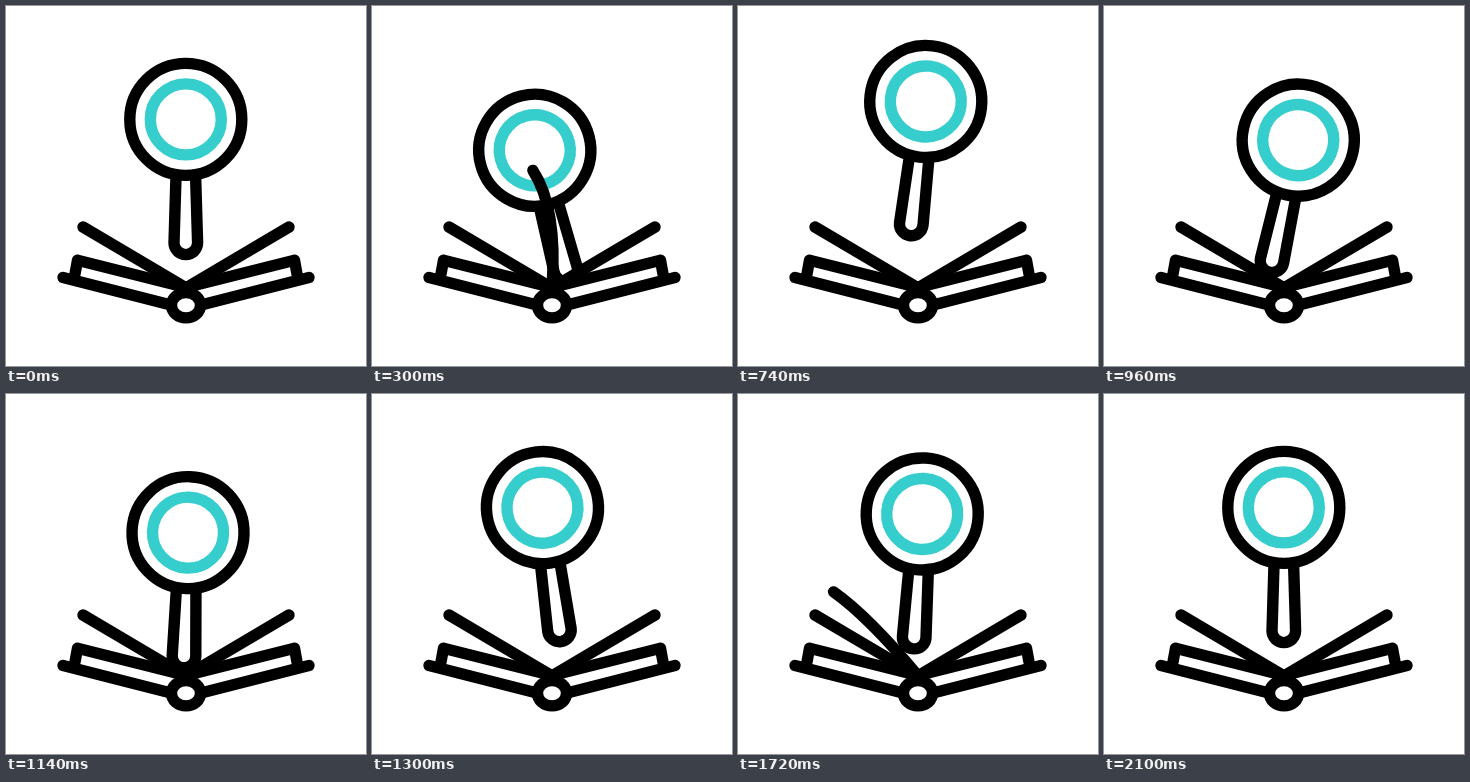
Animation of 360x360 px, one loop 2.4 s. Source, as an HTML page with a canvas:

```html
<!DOCTYPE html>
<html>
<head>
<meta charset="utf-8">
<title>Magnifier over a book</title>
<style>
html, body { margin: 0; width: 100%; height: 100%; overflow: hidden; background: #fff; }
canvas { display: block; width: 360px; height: 360px; }
</style>
</head>
<body>
<canvas id="stage" width="360" height="360"></canvas>
<script>
const ctx = document.getElementById('stage').getContext('2d');
const LOOP = 2400, INK = '#000', TEAL = '#36cdcd';

// [time, value] keys: height of the pivot and tilt in degrees
const LIFT = [[0, 181.4], [350, 211.7], [700, 161.3], [1070, 211], [1420, 170], [1750, 188.2], [2100, 181.4]];
const TILT = [[0, 0], [300, 14.5], [930, -12.6], [1350, 8.7], [1750, -3.9], [2100, 0]];
const FLIPS = [86, 1617], FLIP_TIME = 480;
const PAGE = 119, REST = 30.5 * Math.PI / 180;
const SPINE = { x: 180, y: 281.8 };

const ease = p => p * p * (3 - 2 * p);

function valueAt(keys, t) {
  for (let i = 1; i < keys.length; i++) {
    const [t0, a] = keys[i - 1], [t1, b] = keys[i];
    if (t < t1) return a + (b - a) * ease((t - t0) / (t1 - t0));
  }
  return keys[keys.length - 1][1];
}

function line(...pts) {
  ctx.beginPath();
  pts.forEach(([x, y]) => ctx.lineTo(x, y));
  ctx.stroke();
}

function ring(x, y, rx, ry, color) {
  ctx.strokeStyle = color;
  ctx.beginPath();
  ctx.ellipse(x, y, rx, ry, 0, 0, Math.PI * 2);
  ctx.stroke();
}

function magnifier(t) {
  ctx.save();
  ctx.translate(179.8, valueAt(LIFT, t));
  ctx.rotate(-valueAt(TILT, t) * Math.PI / 180);
  ring(0, -68, 35.5, 35.5, TEAL);
  ring(0, -68, 56, 56, INK);
  ctx.beginPath();
  ctx.moveTo(-9.8, -11);
  ctx.lineTo(-11.8, 55.4);
  ctx.arc(0, 55.4, 11.8, Math.PI, 0, true);
  ctx.lineTo(9.8, -11);
  ctx.stroke();
  ctx.restore();
}

function bookHalf() {
  line([77, 221], [SPINE.x, SPINE.y]);
  line([57, 271.5], [165, 299]);
  line([69, 268], [71.5, 254.2], [180, 281.5]);
}

function book() {
  bookHalf();
  ctx.save();
  ctx.translate(360, 0);
  ctx.scale(-1, 1);
  bookHalf();
  ctx.restore();
  ctx.fillStyle = '#fff';
  ctx.beginPath();
  ctx.ellipse(180, 299.2, 14.5, 12.7, 0, 0, Math.PI * 2);
  ctx.fill();
  ring(180, 299.2, 14.5, 12.7, INK);
}

// A page turns over the spine, its tip lagging behind
function turningPage(p) {
  const a = Math.PI - REST - (Math.PI - 2 * REST) * ease(p);
  const c = Math.cos(a), s = Math.sin(a);
  const bend = 19 * Math.sin(Math.PI * ease(p));
  const { x, y } = SPINE;
  ctx.beginPath();
  ctx.moveTo(x, y);
  ctx.quadraticCurveTo(
    x + c * PAGE * 0.65 + s * bend, y - s * PAGE * 0.65 + c * bend,
    x + c * PAGE, y - s * PAGE);
  ctx.stroke();
}

function draw(t) {
  ctx.fillStyle = '#fff';
  ctx.fillRect(0, 0, 360, 360);
  ctx.lineWidth = 11.4;
  ctx.lineCap = ctx.lineJoin = 'round';
  magnifier(t);
  ctx.strokeStyle = INK;
  for (const start of FLIPS) {
    const p = (t - start) / FLIP_TIME;
    if (p > 0 && p < 1) turningPage(p);
  }
  book();
}

function tick() {
  draw(performance.now() % LOOP);
  requestAnimationFrame(tick);
}
tick();
</script>
</body>
</html>
```
